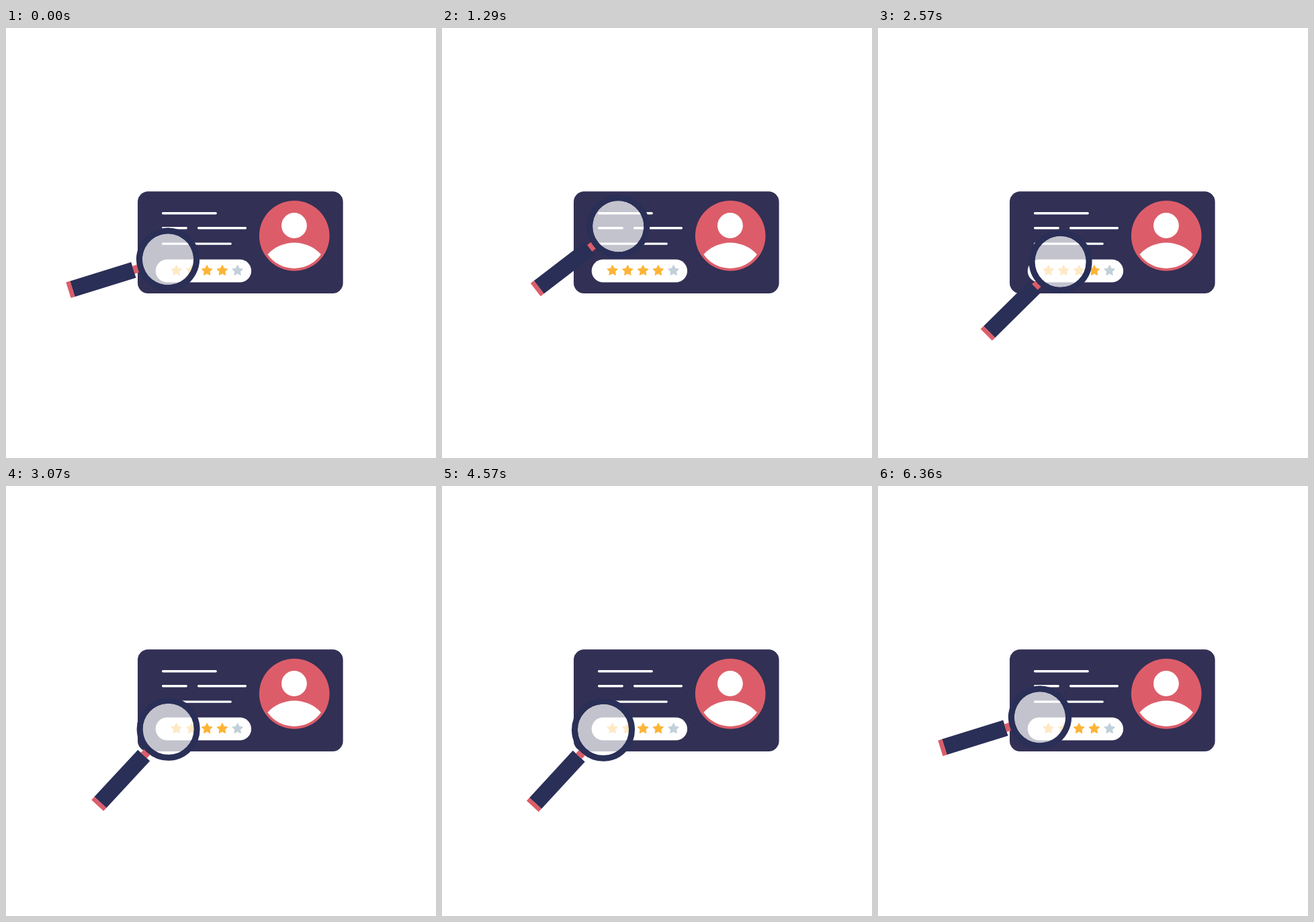
Write an HTML page that moves like this. It is 640 px wide and 640 px high and loops after 6.43 s.

```html
<!DOCTYPE html>
<html lang="en">
<head>
<meta charset="utf-8">
<title>Profile search</title>
<style>
  html, body { margin: 0; width: 100%; height: 100%; overflow: hidden; background: #fff; }
  svg { display: block; width: 100%; height: 100%; }
</style>
</head>
<body>
<svg viewBox="0 0 640 640">
  <defs>
    <path id="rise" d="M241 344.3Q241.5 306 266 293"/>
    <path id="sweep" d="M266 293C311 290 281 364 239.5 361.8"/>
    <path id="wobble" d="M239.5 361.8Q231.5 361.6 240 362.8"/>
    <path id="back" d="M240 362.8Q224.3 353.5 241 344.3"/>
  </defs>

  <rect x="196" y="243.2" width="305.6" height="151.8" rx="15.5" fill="#323055"/>

  <circle cx="429.2" cy="309.2" r="52.3" fill="#dc5d69"/>
  <circle cx="428.9" cy="294" r="18.9" fill="#fff"/>
  <path d="M389.4 337A53.8 53.8 0 0 1 468.8 337A48.4 48.4 0 0 1 389.4 337Z" fill="#fff"/>

  <path d="M233.6 275.7H312.2M233.6 297.7H268.2M286.6 297.7H356.4M233.6 321.1H334.2"
        stroke="#fff" stroke-width="3.4" stroke-linecap="round"/>
  <rect x="222.7" y="344.4" width="142.4" height="34.2" rx="17.1" fill="#fff"/>
  <g id="stars" stroke-width="1.2" stroke-linejoin="round"></g>

  <!-- The handle points left from the lens centre at zero tilt. -->
  <g id="magnifier">
    <rect x="-148.8" y="-12.2" width="95.3" height="24.4" fill="#2a2f57"/>
    <rect x="-155" y="-12.2" width="6.4" height="24.4" fill="#dc5d69"/>
    <rect x="-53.6" y="-6" width="7.2" height="12" fill="#dc5d69"/>
    <circle r="38.2" fill="#fff" fill-opacity=".71"/>
    <circle r="42.5" fill="none" stroke="#2a2f57" stroke-width="9"/>
  </g>
</svg>
<script>
const LOOP = 6430;
const STEP = LOOP / 90;
const byId = id => document.getElementById(id);

// Each move follows its path while the handle tilts by `turn` degrees.
const START_TILT = 17.2;
const moves = [
  { path: byId('rise'), start: 0, end: 1540, turn: 21.9 },
  { path: byId('sweep'), start: 1540, end: 3210, turn: 8.2 },
  { path: byId('wobble'), start: 3360, end: 4300, turn: 0 },
  { path: byId('back'), start: 4720, end: 6400, turn: -30.1 }
];

const smooth = u => u * u * (3 - 2 * u);

function progress(move, time) {
  const u = (time - move.start) / (move.end - move.start);
  return smooth(Math.min(1, Math.max(0, u)));
}

function poseAt(time) {
  const { path, ...current } = moves.findLast(move => move.start <= time);
  const { x, y } = path.getPointAtLength(path.getTotalLength() * progress(current, time));
  const tilt = moves.reduce((sum, move) => sum + move.turn * progress(move, time), START_TILT);
  return { x, y, tilt };
}

function star(cx, cy, color) {
  const points = Array.from({ length: 10 }, (_, k) => {
    const r = k % 2 ? 4 : 7.9;
    const a = k * Math.PI / 5;
    return `${cx + r * Math.sin(a)},${cy - r * Math.cos(a)}`;
  });
  return `<polygon points="${points.join(' ')}" fill="${color}" stroke="${color}"/>`;
}

byId('stars').innerHTML = Array.from({ length: 5 }, (_, i) =>
  star(253.6 + 22.75 * i, 361.2, i < 4 ? '#fdb437' : '#c1d0d9')).join('');

function draw() {
  const now = performance.now() % LOOP;
  const time = Math.floor((now + 6) / STEP) * STEP % LOOP;
  const { x, y, tilt } = poseAt(time);
  byId('magnifier').setAttribute('transform', `translate(${x} ${y}) rotate(${-tilt})`);
  requestAnimationFrame(draw);
}
draw();
</script>
</body>
</html>
```
